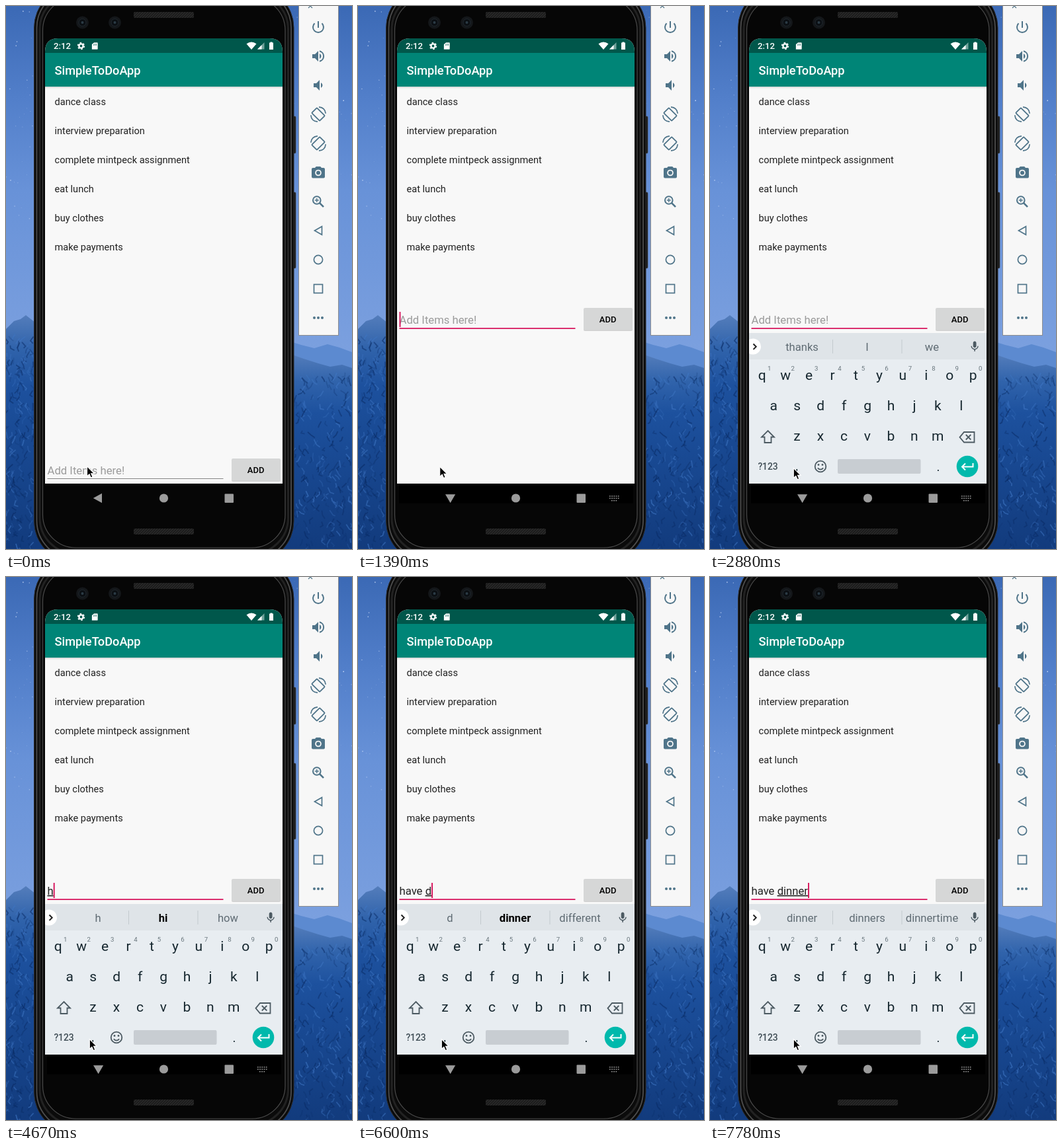
Animation, 523 px wide and 822 px high, one loop 8 s. Source, as an HTML page:

```html
<!DOCTYPE html>
<html lang="en">
<head>
<meta charset="utf-8">
<title>To-do app demo</title>
<style>
  html, body { margin: 0; width: 100%; height: 100%; overflow: hidden; background: #123b7d; }
  svg { display: block; width: 523px; height: 822px; font-family: Roboto, "Noto Sans", sans-serif; }
  text { white-space: pre; }
  .mid { text-anchor: middle; }
  .med { font-weight: 500; }
  .line { fill: none; stroke: #4f7489; stroke-width: 2; }
  .key { fill: none; stroke: #4c5a62; stroke-width: 1.8; }
  .list { font-size: 14.6px; fill: #212121; }
  .entry { font-size: 16.7px; }
  .compose { text-decoration: underline; }
</style>
</head>
<body>
<svg viewBox="0 0 523 822">
  <defs>
    <linearGradient id="sky" x2="0" y2="1">
      <stop stop-color="#3b69b5"/><stop offset=".25" stop-color="#527fca"/>
      <stop offset=".5" stop-color="#6892d8"/><stop offset="1" stop-color="#7ea2e0"/>
    </linearGradient>
    <linearGradient id="land" x2="0" y2="1">
      <stop stop-color="#547dbb"/><stop offset=".14" stop-color="#3063ab"/>
      <stop offset=".3" stop-color="#1d519e"/><stop offset=".5" stop-color="#194a94"/>
      <stop offset="1" stop-color="#123b7d"/>
    </linearGradient>
    <linearGradient id="shade" x2="0" y2="1">
      <stop stop-color="#000" stop-opacity=".16"/><stop offset="1" stop-color="#000" stop-opacity="0"/>
    </linearGradient>
    <pattern id="mesh" width="4" height="4" patternUnits="userSpaceOnUse">
      <rect width="4" height="4" fill="#1d1d1d"/><path d="M0 4L4 0" stroke="#303030"/>
    </pattern>
    <clipPath id="screen"><path d="M59 723V69Q59 49 79 49H398Q418 49 418 69V723Z"/></clipPath>
  </defs>

  <rect width="523" height="560" fill="url(#sky)"/>
  <g id="stars" fill="#dce8ff"/>
  <path d="M0 489L12 477L22 474L30 468L44 479V822H0Z" fill="url(#land)"/>
  <path d="M430 508L446 513L466 518L486 512L504 517L523 524V580H430Z" fill="#5c8ad0"/>
  <path d="M430 527L450 534L472 541L490 546L508 543L523 548V822H430Z" fill="url(#land)"/>
  <g id="rocks" fill="none" stroke-width="1.8"/>

  <!-- phone body -->
  <path d="M434 167h3q1 0 1 2v52q0 2-1 2h-3zM434 282h3q1 0 1 2v111q0 2-1 2h-3z" fill="#1b1b1b" stroke="#444" stroke-width=".6"/>
  <rect x="42.5" y="-29" width="392.5" height="871" rx="62" fill="#0b0b0b" stroke="#2c2c2c"/>
  <rect x="46.5" y="-25" width="384.5" height="862" rx="58" fill="none" stroke="#4d4d4d" stroke-width="1.8"/>
  <rect x="51" y="-19" width="375.5" height="848" rx="54" fill="none" stroke="#222" stroke-width="3"/>
  <rect x="55.5" y="-13" width="366.5" height="833" rx="50" fill="#060606" stroke="#4a4a4a" stroke-width="1.2"/>
  <rect x="193" y="9" width="91" height="9" rx="2" fill="url(#mesh)"/>
  <rect x="193" y="791" width="91" height="9" rx="2" fill="url(#mesh)"/>
  <g id="lenses"/>

  <!-- app -->
  <g clip-path="url(#screen)">
    <rect x="59" y="49" width="359" height="674" fill="#f8f8f8"/>
    <rect x="59" y="122" width="359" height="3" fill="url(#shade)"/>
    <rect x="59" y="49" width="359" height="22" fill="#00574b"/>
    <rect x="59" y="71" width="359" height="51" fill="#008577"/>
    <g fill="#fff">
      <text class="med" x="72" y="65" font-size="13.2">2:12</text>
      <g fill="none" stroke="#fff">
        <circle cx="113.500" cy="60.500" r="3.1" stroke-width="2.4"/>
        <circle cx="113.500" cy="60.500" r="4.8" stroke-width="1.8" stroke-dasharray="2.5 2.527"/>
      </g>
      <path d="M133 55h5q1 0 1 1v9q0 1-1 1h-7.500q-1 0-1-1v-7zM132.500 57.500v2.500M134.500 57v3M136.500 57v3" stroke="#00574b" stroke-width=".7"/>
      <path d="M363.500 57.300Q371 51.500 378.500 57.300L371 66Z"/>
      <path d="M390.500 55V65.500H380Z" opacity=".45"/><path d="M386.500 59V65.500H380Z"/>
      <path d="M399.500 54.500h3v1h1.500v10.500h-6v-10.500h1.500z"/>
      <text class="med" x="73.500" y="104" font-size="18.2">SimpleToDoApp</text>
    </g>
    <g id="items"></g>

    <g id="form">
      <text id="entry" class="entry" x="62.5" y="708.7"><tspan></tspan><tspan class="compose"></tspan></text>
      <rect id="rule" x="62.5" width="266" />
      <rect id="caret" y="691" width="2" height="23" fill="#d81b60"/>
      <rect x="341" y="686.500" width="74" height="33.500" rx="2" fill="#000" opacity=".16"/>
      <rect x="341" y="685" width="74" height="33.800" rx="2" fill="#d6d7d7"/>
      <text class="mid med" x="377.600" y="706.500" font-size="13">ADD</text>
    </g>

    <g id="board">
      <rect x="59" y="495" width="359" height="228" fill="#e8edf1"/>
      <rect x="59" y="495" width="359" height="40" fill="#dfe4e8"/>
      <circle cx="65" cy="515.500" r="12" fill="#fff"/>
      <path d="M65.500 511.500l4.200 4.200l-4.200 4.200" fill="none" stroke="#222" stroke-width="2"/>
      <path d="M185.500 505v21M290 505v21" stroke="#c3c9cd"/>
      <g id="hints" font-size="16.6"></g>
      <path transform="translate(390.500 506) scale(.8)" fill="#4c5a62" d="M12 14c1.660 0 3-1.340 3-3V5c0-1.660-1.340-3-3-3S9 3.340 9 5v6c0 1.660 1.340 3 3 3zm5.300-3c0 3-2.540 5.100-5.300 5.100S6.700 14 6.700 11H5c0 3.400 2.700 6.200 6 6.700V21h2v-3.300c3.300-.5 6-3.300 6-6.700z"/>
      <g id="keys" fill="#16272f"></g>
      <path class="key" d="M87.500 643L97 652.500H92.500V661H82.500V652.500H78Z"/>
      <path class="key" d="M384 645h15.500v15.500H384L377.500 652.800ZM386.800 649l7.500 7.500M394.300 649l-7.500 7.500"/>
      <text class="mid med" x="87.500" y="702" font-size="13.8" fill="#3f4d55">?123</text>
      <text class="mid" x="131" y="703" font-size="19" fill="#16272f">,</text>
      <circle class="key" cx="167" cy="697" r="8.300"/>
      <path class="key" d="M162.800 699.300q4.200 4.600 8.400 0"/>
      <circle cx="164" cy="694.500" r="1.400" fill="#4c5a62"/><circle cx="170" cy="694.500" r="1.400" fill="#4c5a62"/>
      <rect x="193" y="686" width="125.500" height="22" rx="2" fill="#c8cdd2"/>
      <text class="mid" x="345" y="703.500" font-size="19" fill="#16272f">.</text>
      <circle cx="389" cy="697" r="16.300" fill="#00b9ac"/>
      <path d="M397.500 692v5.500H381.500M386 692.500l-5 5l5 5" fill="none" stroke="#fff" stroke-width="2"/>
    </g>
  </g>

  <!-- navigation -->
  <rect id="nav" x="62" y="723" width="354" height="30"/>
  <g fill="#9b9b9b">
    <path id="back"/>
    <circle cx="238.500" cy="745" r="6.600"/>
    <rect x="330.500" y="738.500" width="13.500" height="13.500" rx="1"/>
  </g>
  <path id="kbd" d="M380 742h14.500M380 745.300h14.500M383 748.800h8.500" stroke="#9b9b9b" stroke-width="1.600" stroke-dasharray="1.700 1.500"/>

  <!-- tool strip -->
  <rect x="442.500" y="-5" width="60" height="503.500" fill="#f7f7f7" stroke="#8d8d8d"/>
  <g class="line">
    <path d="M457 3l6-6M463 3l-6-6" stroke-width="1.200"/>
    <path d="M472 23v10M466.500 26.200a8 8 0 1 0 11 0"/>
    <g id="rotate" stroke-width="1.800">
      <rect x="-5.500" y="-8.500" width="11" height="17" rx="1" transform="translate(472 164) rotate(-45)"/>
      <path d="M473 152.800q9.500 1 10.200 10M471 175.200q-9.500-1-10.200-10" stroke-width="1.700"/>
    </g>
    <use href="#rotate" transform="translate(944 44) scale(-1 1)"/>
    <circle cx="469.800" cy="294" r="5.800"/>
    <path d="M474 298.200l6 6" stroke-width="2.600"/><path d="M466.800 294h6M469.800 291v6" stroke-width="1.400"/>
    <path d="M477.500 333.800v12.400L466.500 340z" stroke-width="1.700"/>
    <circle cx="472" cy="384" r="6.600" stroke-width="1.700"/>
    <rect x="465.500" y="421.500" width="13" height="13" stroke-width="1.700"/>
    <path d="M474 68.300a7.900 7.900 0 0 1 0 15.400"/>
  </g>
  <g fill="#4f7489">
    <g id="speaker">
      <path d="M463 73h4l5-5v16l-5-5h-4z"/>
      <path d="M474 72q2.500 1.300 2.500 4t-2.500 4z"/>
    </g>
    <use href="#speaker" x="2" y="44"/>
    <path fill-rule="evenodd" d="M468.800 243h6.400l1.800 2h3q2 0 2 2v11.500q0 2-2 2h-16q-2 0-2-2V247q0-2 2-2h3zM472 247.700a4.800 4.800 0 1 0 .01 0z"/>
    <circle cx="472" cy="252.500" r="3"/>
    <circle cx="466" cy="472" r="2"/><circle cx="472" cy="472" r="2"/><circle cx="478" cy="472" r="2"/>
  </g>

  <path id="mouse" d="M0 0V15L3.500 11.800L5.900 17.300L8.500 16.200L6.200 10.900H10.800Z" fill="#000" stroke="#fff" stroke-width="1.100"/>
</svg>
<script>
const LOOP = 8000;
const $ = id => document.getElementById(id);

function add(parent, tag, attrs, text) {
  const el = document.createElementNS('http://www.w3.org/2000/svg', tag);
  for (const k in attrs) el.setAttribute(k, attrs[k]);
  if (text) el.textContent = text;
  return $(parent).appendChild(el);
}

let seed = 11;
const rnd = (a, b) => {
  seed = (seed * 16807) % 2147483647;
  return a + (b - a) * seed / 2147483647;
};

// wallpaper: stars and rocky slopes on both sides of the phone
for (let i = 0; i < 56; i++) {
  const left = i % 2;
  add('stars', 'circle', {
    cx: left ? rnd(0, 42) : rnd(436, 523), cy: rnd(0, 330),
    r: rnd(.3, .9), opacity: rnd(.25, .8)
  });
}
for (let i = 0; i < 420; i++) {
  const left = i % 2;
  const x = left ? rnd(-4, 42) : rnd(436, 522), y = rnd(left ? 490 : 550, 820);
  add('rocks', 'path', {
    d: `M${x} ${y}l${rnd(-6, 6)} ${rnd(3, 8)}l${rnd(-5, 6)} ${rnd(1, 6)}`,
    stroke: rnd(0, 1) < .4 ? '#3f76c4' : '#0a2c66', opacity: rnd(.15, .6)
  });
}

for (const x of [115.5, 164.5]) {
  add('lenses', 'circle', { cx: x, cy: 25, r: 9.5, fill: '#14171a' });
  add('lenses', 'circle', { cx: x, cy: 25, r: 5.5, fill: '#0b0f13', stroke: '#20282e' });
  add('lenses', 'circle', { cx: x, cy: 25, r: 2, fill: '#2b3b45' });
}

['dance class', 'interview preparation', 'complete mintpeck assignment',
 'eat lunch', 'buy clothes', 'make payments'].forEach((item, i) =>
  add('items', 'text', { class: 'list', x: 73.5, y: 150 + i * 44 }, item));

[['qwertyuiop', 78.7, 566], ['asdfghjkl', 96.3, 612], ['zxcvbnm', 131.5, 658]].forEach(([row, x0, y], r) =>
  [...row].forEach((ch, i) => {
    const x = x0 + i * 35.45;
    add('keys', 'text', { class: 'mid', x, y, 'font-size': 21 }, ch);
    if (!r) add('keys', 'text', { class: 'mid', x: x + 11, y: 551.5, 'font-size': 9.6, fill: '#68757c' }, (i + 1) % 10 + '');
  }));

const hints = [139, 237.5, 335.5].map(x => add('hints', 'text', { class: 'mid', x, y: 522 }));

// [start, committed text, composing text, suggestions, middle is bold]
const typing = [
  [0, '', '', ''],
  [1690, '', '', 'thanks,I,we'],
  [4670, '', 'h', 'h,hi,how', 1],
  [4820, '', 'ha', 'ha,have,had', 1],
  [4970, '', 'hav', 'ha,have,had', 1],
  [5110, '', 'hav', 'hav,have,having', 1],
  [5260, '', 'have', 'have,haven\u2019t,having'],
  [5550, 'have ', '', 'you,a,food'],
  [6450, 'have ', 'd', 'you,a,food'],
  [6600, 'have ', 'd', 'd,dinner,different', 1],
  [6750, 'have ', 'di', 'di,dinner,different', 1],
  [7050, 'have ', 'din', 'din,dinner,Din', 1],
  [7190, 'have ', 'dinn', 'dinn,dinner,Dinn', 1],
  [7490, 'have ', 'dinne', 'dinne,dinner,dinners', 1],
  [7780, 'have ', 'dinner', 'dinner,dinners,dinnertime']
];
const blinks = [[0, 0], [950, 1], [1830, 0], [2280, 1], [2880, 0], [3330, 1], [3770, 0], [4370, 1], [6000, 0], [6450, 1]];
const pointer = [[0, 122.5, 696.8], [500, 122.8, 695.8], [650, 123.7, 697.3], [1690, 126.3, 699.5]];
// keyboard entrance: [start, offset, opacity]
const entrance = [[0, 0, 0], [1540, 22, .6], [1690, 0, 1]];

const at = (steps, t) => steps.findLast(s => s[0] <= t);
const pen = document.createElement('canvas').getContext('2d');
pen.font = '16.7px Roboto, "Noto Sans", sans-serif';
const [plain, composed] = $('entry').children;

function draw(t) {
  const [, done, word, tips, bold] = at(typing, t);
  const empty = !(done + word), focused = t >= 950, open = t >= 1390;

  plain.textContent = empty ? 'Add Items here!' : done;
  composed.textContent = word;
  $('entry').setAttribute('fill', empty ? '#9b9b9b' : '#212121');
  $('caret').setAttribute('x', 62.5 + pen.measureText(done + word).width);
  $('caret').setAttribute('opacity', at(blinks, t)[1]);

  const rule = $('rule');
  rule.setAttribute('y', focused ? 715.2 : 715);
  rule.setAttribute('height', focused ? 1.8 : 1);
  rule.setAttribute('fill', focused ? '#d81b60' : '#858585');
  rule.setAttribute('opacity', t >= 950 && t < 1100 ? .7 : 1);
  $('form').setAttribute('transform', `translate(0 ${open ? -228 : 0})`);

  const [, drop, alpha] = at(entrance, t);
  $('board').setAttribute('transform', `translate(0 ${drop})`);
  $('board').setAttribute('opacity', alpha);
  const words = tips.split(',');
  hints.forEach((h, i) => {
    const strong = bold && i === 1;
    h.textContent = words[i] || '';
    h.setAttribute('fill', strong ? '#000' : '#5f6b73');
    h.setAttribute('font-weight', strong ? 700 : 400);
  });

  $('back').setAttribute('d', open ? 'M132 739.2H147.200L139.600 752.300Z' : 'M145 737.800V752.200L131.800 745Z');
  $('nav').setAttribute('opacity', +open);
  $('kbd').setAttribute('opacity', +open);
  const [, mx, my] = at(pointer, t);
  $('mouse').setAttribute('transform', `translate(${mx} ${my})`);
}

const start = performance.now();
function tick(now) {
  draw(Math.max(0, now - start) % LOOP);
  requestAnimationFrame(tick);
}
draw(0);
requestAnimationFrame(tick);
</script>
</body>
</html>
```
